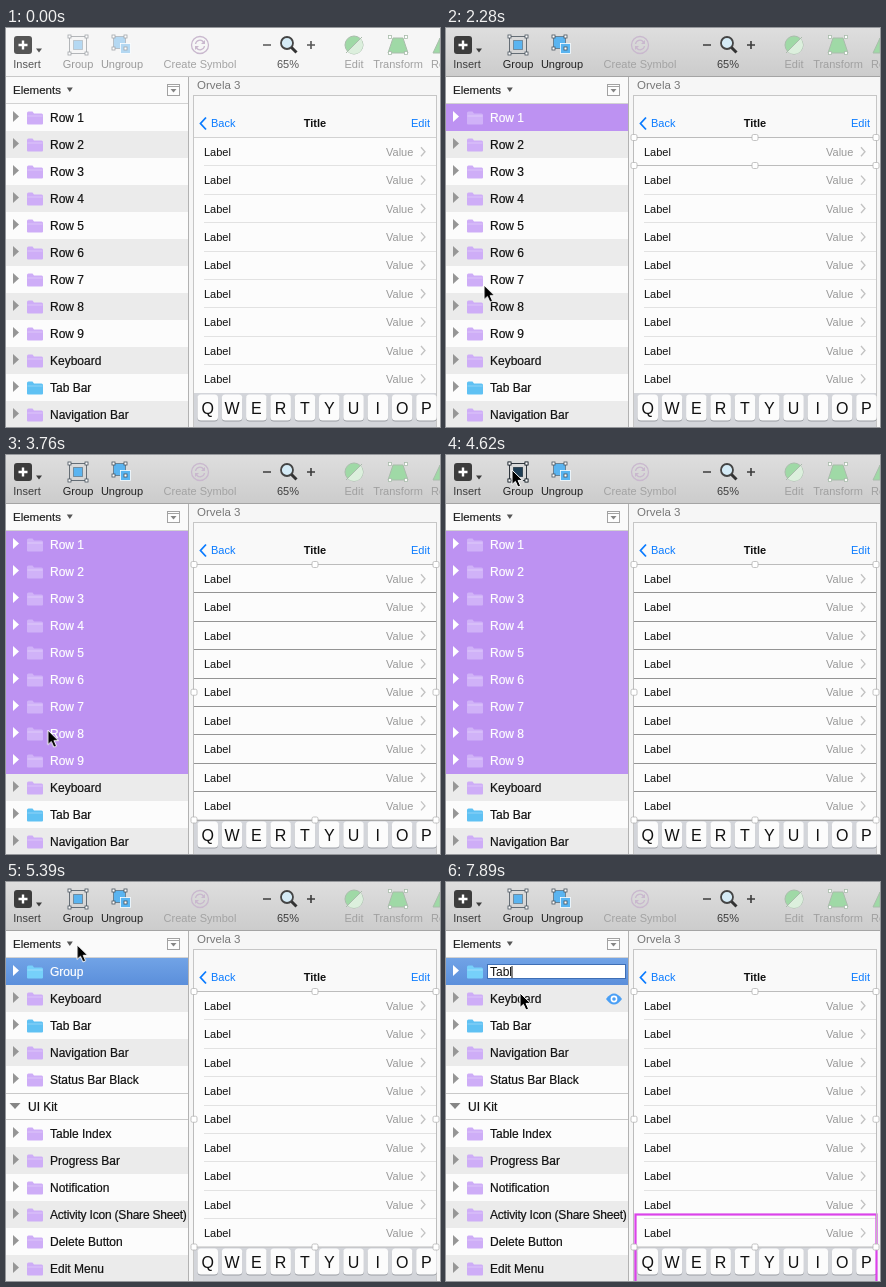
Animation of 434 by 399 pixels, one loop 8000 ms. Source, as an HTML page:

```html
<!DOCTYPE html>
<html lang="en">
<head>
<meta charset="utf-8">
<title>Grouping layers</title>
<style>
  html, body { margin: 0; width: 100%; height: 100%; overflow: hidden; background: #f7f7f7; }
  svg { display: block; width: 434px; height: 399px; }
  text { font: 11px "Liberation Sans", Arial, sans-serif; white-space: pre; }
  .side text { font-size: 12px; stroke-width: .2px; }
  .mid { text-anchor: middle; }
  .win { animation: 8s step-end infinite; }
  .cursor { animation: move 8s linear infinite; }
  @keyframes move {
    0%, 8.5% { transform: translate(-20px, 88px); }
    8.625% { transform: translate(-6px, 88px); animation-timing-function: ease-out; }
    12.125%, 26.25% { transform: translate(41px, 87px); }
    28.5% { transform: translate(38px, 257px); animation-timing-function: ease-out; }
    34.25%, 45.4% { transform: translate(39px, 306px); animation-timing-function: ease-in-out; }
    52.5%, 67.3% { transform: translate(66px, 15px); }
    67.375% { transform: translate(71px, 62px); animation-timing-function: ease-out; }
    69.625%, 77.6% { transform: translate(84px, 154px); animation-timing-function: ease-in-out; }
    82.875%, 100% { transform: translate(74px, 111px); }
  }
</style>
</head>
<body>
<svg id="stage" viewBox="0 0 434 399"></svg>
<script>
const END = 8000, ROW = 27, TOP = 76;
const CLICK = 1300, MULTI = 2890, PICKED = 2950, PRESS = 4620, GROUPED = 4730, SETTLED = 4790, RENAME = 6400;
const rules = [];

const rect = (x, y, w, h, fill, more = '') =>
  `<rect x="${x}" y="${y}" width="${w}" height="${h}" fill="${fill}" ${more}/>`;
const path = (d, fill, more = '') => `<path d="${d}" fill="${fill}" ${more}/>`;
const line = (d, color, width = 1) => path(d, 'none', `stroke="${color}" stroke-width="${width}"`);
const text = (x, y, s, fill = '#111', more = '') => `<text x="${x}" y="${y}" fill="${fill}" ${more}>${s}</text>`;
const mid = (x, y, s, fill, more = '') => text(x, y, s, fill, `class="mid" ${more}`);
const at = (x, y, body) => `<g transform="translate(${x} ${y})">${body}</g>`;
const list = (n, fn) => Array.from({ length: n }, (_, i) => fn(i)).join('');

// Shows its content only between two moments of the loop.
function during(from, to, body) {
  const name = 'w' + rules.length;
  const pc = t => t / END * 100 + '%';
  rules.push(`@keyframes ${name}{0%{opacity:0}${pc(from)}{opacity:1}${pc(to)}{opacity:0}}`);
  return `<g class="win" style="animation-name:${name}">${body}</g>`;
}

const grad = (id, a, b) => `<linearGradient id="${id}" x2="0" y2="1"><stop stop-color="${a}"/><stop offset="1" stop-color="${b}"/></linearGradient>`;
const defs = `<defs>${grad('bar', '#dedede', '#cccccc')}${grad('blue', '#71a3e6', '#5b8fdb')}</defs>`;

// Toolbar
const knobs = (x, y, s, color) => [[0, 0], [s, 0], [0, s], [s, s]]
  .map(([a, b]) => rect(x + a - 1.5, y + b - 1.5, 3, 3, '#fff', `stroke="${color}" stroke-width=".8"`)).join('');
const groupIcon = (fill, ink) =>
  rect(63.5, 8.5, 17, 17, 'none', `stroke="${ink}" stroke-width=".8"`) +
  rect(67.5, 12.5, 9, 9, fill, `stroke="${ink}" stroke-opacity=".5"`) + knobs(63.5, 8.5, 17, ink);
const ungroupIcon = (fill, ink) =>
  rect(107.5, 8.5, 12, 12, fill, `stroke="${ink}" stroke-width=".6"`) +
  rect(114.5, 15.5, 10, 10, fill, 'stroke="#fff" stroke-width=".8"') +
  knobs(107.5, 8.5, 12, ink);
const grouping = (fill, ink, label) =>
  groupIcon(fill, ink) + ungroupIcon(fill, ink) + mid(72, 40, 'Group', label) + mid(116, 40, 'Ungroup', label);

const tools = ink =>
  rect(8, 8, 18, 18, ink, 'rx="3"') + line('M12.5 17h9M17 12.5v9', '#fff', 2.4) +
  path('M30 20.5h6l-3 4z', ink) + mid(21, 40, 'Insert', ink) +
  line('M257 17h8M301 17h8M305 13v8', ink, 1.6) + mid(282, 40, '65%', ink);

const GREEN = '#9fd9a6', EDGE = '#a9bcab', RING = '#c9b8ce';
const disabled =
  `<circle cx="194" cy="17" r="8.5" fill="none" stroke="${RING}" stroke-width="1.3"/>` +
  line('M189.5 16a4.5 4.5 0 0 1 8-2M198.5 18a4.5 4.5 0 0 1-8 2', RING, 1.3) +
  path('M199 12v4h-4zM189 22v-4h4z', RING) +
  `<circle cx="348" cy="17" r="9" fill="${GREEN}" stroke="${EDGE}"/>` +
  path('M341.6 23.4L354.4 10.6A9 9 0 0 1 341.6 23.4z', '#dcefdd') + line('M340 25L356 9', EDGE) +
  path('M387 10h10l5 15h-20z', GREEN, `stroke="${EDGE}"`) + knobs(384, 9, 16, EDGE) +
  path('M427 25l7-15v15z', GREEN, `stroke="${EDGE}"`) +
  mid(194, 40, 'Create Symbol', '#a3a3a3') + mid(348, 40, 'Edit', '#a0a0a0') +
  mid(392, 40, 'Transform', '#a0a0a0') + text(425, 40, 'Rotate', '#a0a0a0');

const toolbar = rect(0, 0, 434, 49, '#f6f6f6') + rect(0, 48, 434, 1, '#c8c8c8') +
  during(CLICK, END, rect(0, 0, 434, 48, 'url(#bar)') + rect(0, 48, 434, 1, '#a4a4a4')) +
  during(0, CLICK, tools('#555') + grouping('#b4d8f2', '#a2a6aa', '#9a9a9a')) +
  during(CLICK, END, tools('#3c3c3c') + grouping('#5ab4f0', '#49545e', '#222')) +
  during(PRESS, GROUPED, groupIcon('#1e3d54', '#222a30')) +
  `<circle cx="281" cy="15" r="6" fill="#d5ebf6" stroke="#444" stroke-width="1.8"/>` + line('M285.5 19.5l5 5', '#333', 3) +
  disabled;

// Layer list
const PURPLE = '#ceadf7', SKY = '#5fc1f3';
const folder = (y, fill) => at(21, y - 6.5,
  path('M0 1.5q0-1.5 1.5-1.5h4l1.5 2h7.5q1.5 0 1.5 1.5v8.500q0 1-1 1h-14q-1 0-1-1z', fill) +
  line('M.5 4.5h15', 'rgba(255,255,255,.3)'));

function row(i, name, fill = PURPLE, bg = i % 2 ? '#ebebeb' : '#fcfcfc', ink = '#111', arrow = '#969696') {
  const top = TOP + i * ROW, y = top + 14;
  const tight = name.length > 24 ? 'letter-spacing="-.2"' : '';
  return rect(0, top, 182, ROW, bg) + path(`M7 ${y - 7}l6 5.5-6 5.5z`, arrow) +
    folder(y, fill) + text(44, y + 4, name, ink, `stroke="${ink}" ${tight}`);
}
const picked = i => row(i, 'Row ' + (i + 1), '#d0b2f8', '#bd92f2', '#fff', '#fff');
const eye = (i, color) => at(168, TOP + ROW * i + 14,
  path('M-8 0Q0-11 8 0Q0 11-8 0z', color) + `<circle r="3.4" fill="#fff"/><circle r="1.8" fill="${color}"/>`);

const before = list(9, i => row(i, 'Row ' + (i + 1))) +
  row(9, 'Keyboard') + row(10, 'Tab Bar', SKY) + row(11, 'Navigation Bar') +
  during(CLICK, GROUPED, picked(0)) +
  during(MULTI, GROUPED, list(8, i => picked(i + 1))) +
  during(1510, 2110, eye(0, '#f6edff'));

const kit = ['Table Index', 'Progress Bar', 'Notification', 'Activity Icon (Share Sheet)', 'Delete Button', 'Edit Menu'];
const after = row(0, 'Group', '#76d0fa', 'url(#blue)', '#fff', '#fff') +
  row(1, 'Keyboard') + row(2, 'Tab Bar', SKY) + row(3, 'Navigation Bar') + row(4, 'Status Bar Black') +
  rect(0, 211, 182, 27, '#fcfcfc') + rect(0, 211, 182, 1, '#c9c9c9') + rect(0, 237, 182, 1, '#c9c9c9') +
  path('M3.5 221h11l-5.5 6z', '#858585') + text(22, 229, 'UI Kit', '#111', 'stroke="#111"') +
  kit.map((name, i) => row(i + 6, name)).join('');

const typed = [['T', 7440, 51], ['Ta', 7620, 56.5], ['Tab', 7800, 63], ['Tabl', 7890, 65.5]];
const field = rect(41.5, 82.5, 138, 14, '#fff', 'stroke="#3f6fb5"') +
  during(RENAME, 7440, rect(43, 83, 34, 13, '#b2d6fd') + text(44, 94, 'Group')) +
  typed.map(([s, from, x], i) => during(from, typed[i + 1]?.[1] ?? END, text(44, 94, s) + rect(x, 84, 1, 12, '#111'))).join('');

const sidebar = `<g class="side">` + rect(0, 49, 182, 350, '#fafafa') +
  text(7, 66, 'Elements', '#222', 'stroke="#222" style="font-size:11.5px"') + path('M60.8 59.5h6l-3 4.5z', '#555') +
  rect(161.5, 56.5, 12, 11, '#fdfdfd', 'stroke="#a2a2a2"') + line('M162 58.5h11', '#a2a2a2') + path('M164.5 61h6l-3 3.5z', '#858585') +
  rect(0, 75, 182, 1, '#d2d2d2') +
  during(0, GROUPED, before) +
  during(GROUPED, END, after) +
  during(5750, 6260, eye(2, '#4a9ff5')) + during(6630, END, eye(1, '#4a9ff5')) +
  during(RENAME, END, field) +
  rect(182, 49, 1, 350, '#b2b2b2') + '</g>';

// Canvas
const cell = i => 109.5 + 28.4 * i;
const handle = ([x, y]) => rect(x - 3, y - 3, 6, 6, '#fff', 'rx="1.5" stroke="#b4b4b4" stroke-width=".8"');
const frame = (a, b, sides) => rect(187.5, a, 243, b - a, 'none', 'stroke="#bcbcbc"') +
  [188, 309, 430].flatMap(x => [[x, a], [x, b]]).concat(sides ? [[188, (a + b) / 2], [430, (a + b) / 2]] : []).map(handle).join('');
const outline = (x, y, w, h) => rect(x, y, w, h, 'none', 'stroke="#db43ea" stroke-width="2.2"');

const keys = [...'QWERTYUIOP'].map((c, i) => {
  const x = 191.5 + 24.3 * i;
  return rect(x, 367.5, 20.5, 26, '#9b9ea4', 'rx="3.5"') + rect(x, 366.5, 20.5, 26, '#fcfcfc', 'rx="3.5"') +
    mid(x + 10.25, 386, c, '#111', 'style="font-size:16px"');
}).join('');

const canvas = rect(183, 49, 251, 350, '#f6f6f6') +
  text(191, 61, 'Orvela 3', '#777', 'style="font-size:11.5px"') +
  rect(187.5, 67.5, 243, 340, '#fcfcfc', 'stroke="#c6c6c6"') + rect(188, 68, 242, 41, '#f9f9f9') +
  line('M200 89.5l-5.5 6 5.5 6', '#0a7bff', 1.8) + text(205, 99, 'Back', '#0a7bff') +
  mid(309, 99, 'Title', '#111', 'style="font-weight:bold"') + text(405, 99, 'Edit', '#0a7bff') +
  rect(188, 109, 242, 1, '#d2d2d2') +
  list(9, i => {
    const y = cell(i) + 14.2;
    return text(198, y + 4, 'Label') + text(380, y + 4, 'Value', '#999') +
      line(`M415 ${y - 4.5}l4 4.5-4 4.5`, '#c2c2c2', 1.3) + rect(198, Math.floor(cell(i + 1)), 232, 1, '#e2e2e2');
  }) +
  rect(188, 365, 242, 34, '#d3d5da') + keys +
  during(CLICK, PICKED, frame(109.5, 137.5)) +
  during(2740, PICKED, outline(188.5, 337, 241.5, 28)) +
  during(PICKED, SETTLED, list(10, i => rect(188, Math.floor(cell(i)), 242, 1, '#949494'))) +
  during(6450, END, outline(189.5, 332.5, 241, 80)) +
  during(PICKED, END, frame(109.5, 365, true));

const cursor = `<g class="cursor">${path('M0 0v14.5l3.4-3.1 2.5 5.6 2.7-1.1-2.5-5.5h4.600z', '#000', 'stroke="#fff" stroke-linejoin="round"')}</g>`;

document.getElementById('stage').innerHTML = defs + canvas + sidebar + toolbar + cursor;
document.head.appendChild(document.createElement('style')).textContent = rules.join('\n');
</script>
</body>
</html>
```
